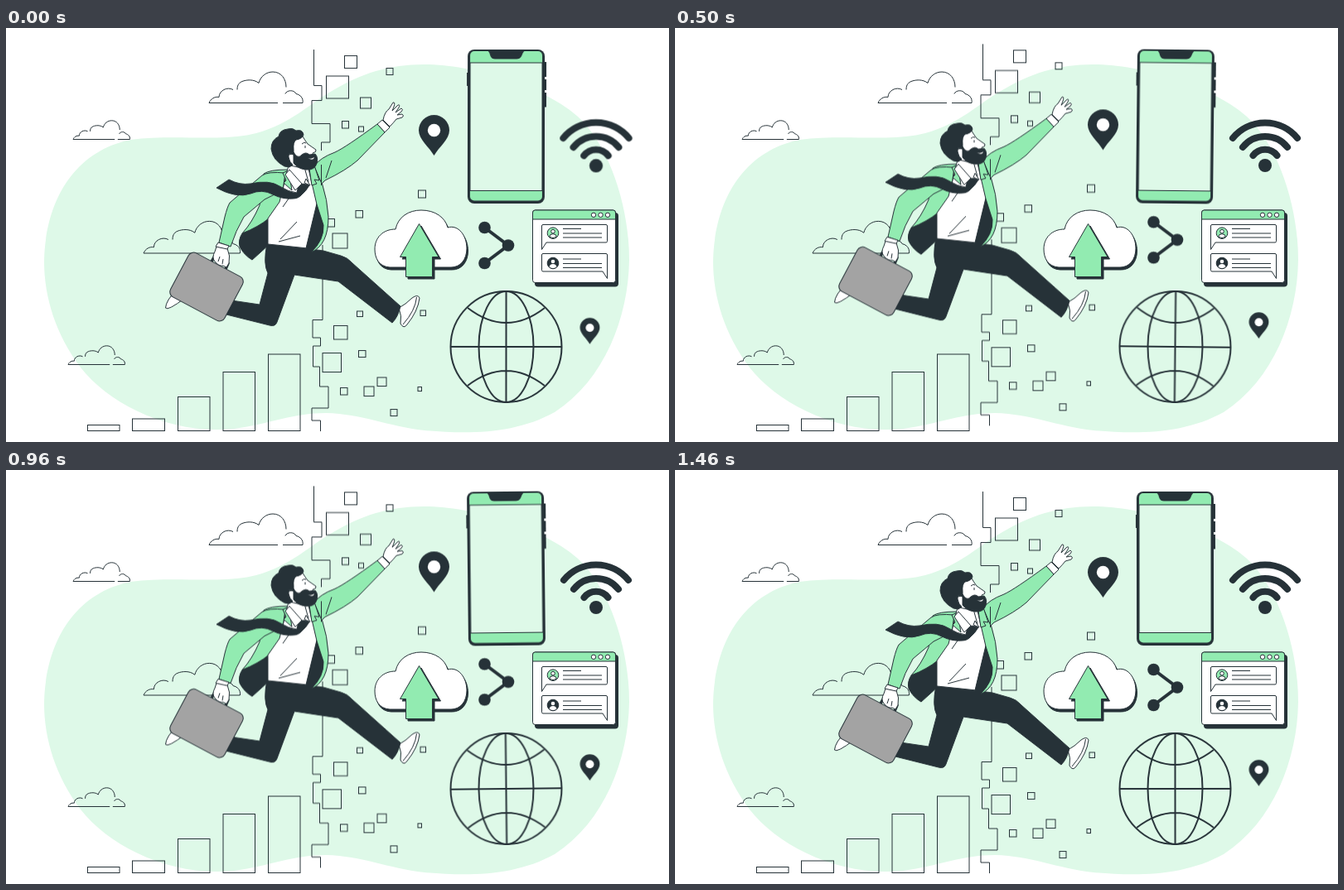
Write an HTML page without scripts that moves like this. It is 800x500 px and loops after 1500 ms.

```html
<!DOCTYPE html>
<html lang="en">
<head>
<meta charset="utf-8">
<title>Leap into digital</title>
<style>
  html, body { margin: 0; width: 100%; height: 100%; overflow: hidden; background: #fff; }
  svg { display: block; width: 100%; height: 100%; }
  .line { fill: none; stroke: #263238; stroke-width: 1; }
  .ink { fill: #263238; }
  .tint { fill: #def9e8; }
  .green { fill: #92ebb1; }
  .white { fill: #fff; }
  .edge { stroke: #263238; stroke-width: 1; stroke-linejoin: round; }
  .thin path { vector-effect: non-scaling-stroke; }

  .float, .sway, .beat { animation: float 1.5s linear -20ms infinite; }
  .sway { animation-name: sway; }
  .beat { animation-name: beat; transform-origin: 712px 142px; }
  .phone { transform-origin: 604px 119px; }
  .globe { transform-origin: 603.5px 385px; }

  @keyframes float {
    0%, 100% { transform: translateY(.3px); }
    50% { transform: translateY(-9.7px); }
  }
  @keyframes sway {
    0%, 100% { transform: rotate(0deg); }
    25% { transform: rotate(1deg); }
    75% { transform: rotate(-1deg); }
  }
  @keyframes beat {
    0%, 30%, 40%, 60%, 100% { transform: scale(1); }
    10%, 50% { transform: scale(1.1); }
  }
</style>
</head>
<body>
<svg viewBox="0 0 800 500">
  <defs>
    <g id="cloud" class="line thin">
      <path d="M0 0H83M89 0H113C114-6 110-10 105-11C103-16 94-16 92-11M93-19C93-29 87-37.5 77-37.5C69-37.5 62-32 60-24C54-29 45-28 40-26C35-24 34-20 34-16M29-16C22-20 12-15 12-7C7-8 2-5 0 0"/>
    </g>
    <g id="pin">
      <path class="ink" d="M0 30.5C-6 20-18.5 11-18.5 0A18.5 18.5 0 0 1 18.5 0C18.5 11 6 20 0 30.5Z"/>
      <circle class="white" r="7.7"/>
    </g>
    <path id="upload" d="M463 289C450 288 445 278 445 267C445 253 455 243 470 243C473 228 486 220 501 220C518 220 530 229 533 241C546 237 556 251 556 266C556 280 548 289 537 289Z"/>
    <path id="arrow" d="M498.5 236.5L522 276.5H514.5V300.5H482.5V276.5H475.5Z"/>
    <g id="bust">
      <circle cy="-2" r="2.3"/>
      <path d="M-4.3 4.5Q-4 1 0 1T4.3 4.5Q0 7.5-4.3 4.5Z"/>
    </g>
    <path id="lines" class="line" d="M0 0H22M0 5.5H47M0 10.5H47"/>
  </defs>

  <path class="tint" d="M46 282C47 215 78 150 150 135C205 128 260 138 302 127C345 115 365 92 395 75C430 54 465 43 510 44C575 46 655 75 690 107C728 142 752 215 752 280C751 350 722 425 662 464C615 490 560 491 505 486C460 481 430 466 386 465C345 465 320 478 275 484C200 492 125 455 90 410C60 370 46 325 46 282Z"/>

  <use href="#cloud" x="245" y="90.5"/>
  <use href="#cloud" transform="translate(81 134.5) scale(.605)"/>
  <use href="#cloud" transform="translate(166 272) scale(1.03)"/>
  <use href="#cloud" transform="translate(75 406.5) scale(.605)"/>

  <g class="line">
    <rect x="98.5" y="479.5" width="38.5" height="7"/>
    <rect x="152.5" y="472" width="39" height="14.5"/>
    <rect x="207.5" y="445.5" width="38.5" height="41"/>
    <rect x="262" y="415.5" width="38.5" height="71"/>
    <rect x="316.5" y="394" width="38.5" height="92.5"/>
  </g>

  <!-- pixel edge -->
  <g class="line float">
    <path d="M371.5 26V69.5H381V87.5H369V115.5H391V138H380.5V148M382 262V352.5H370V374H379.5V384H370.5V409H378.5V433H389V459H369V474H379.5V487"/>
    <rect x="408.5" y="33.5" width="15" height="15"/>
    <rect x="386.5" y="58" width="27" height="27"/>
    <rect x="459" y="48.5" width="8" height="8"/>
    <rect x="427.5" y="84" width="13" height="13"/>
    <rect x="405.5" y="112.5" width="8" height="8.5"/>
    <rect x="425.5" y="119" width="6" height="6"/>
    <rect x="497.5" y="196" width="9" height="9"/>
    <rect x="422" y="220.5" width="8.5" height="8.5"/>
    <rect x="387" y="230.5" width="9.5" height="9.5"/>
    <rect x="394" y="248" width="18" height="18"/>
    <rect x="448.5" y="320" width="9" height="9"/>
    <rect x="423.5" y="342" width="7" height="6.5"/>
    <rect x="500" y="341" width="6.5" height="6.5"/>
    <rect x="395.5" y="359.5" width="16.5" height="16.5"/>
    <rect x="425.5" y="389.5" width="8.5" height="8"/>
    <rect x="382" y="392.5" width="22.5" height="23"/>
    <rect x="403.5" y="434.5" width="8.5" height="8.5"/>
    <rect x="432" y="433" width="12" height="11.5"/>
    <rect x="448" y="422" width="11" height="10.5"/>
    <rect x="497" y="433.5" width="4.5" height="5"/>
    <rect x="464" y="460.5" width="8" height="8"/>
  </g>

  <!-- runner -->
  <g class="float">
    <g class="edge">
      <path class="white" d="M206 316Q193 329 192.500 338Q195 342 216 326Z"/>
      <path class="white" d="M474 338Q482 334 490 326Q497 321 499 326Q497 342 484 358Q480 364 476 357Q478 348 474 338Z"/>
      <path fill="none" d="M495.500 325Q494 341 479 358"/>
      <path class="ink" d="M315 260L383 269L404 275Q412 277 418 284L476 336Q473 349 466 356L401 306L348 298L327 355Q325 361 318 359L262 345L272 329L306 334L316 296Q310 285 315 260Z"/>

      <!-- coat and shirt -->
      <path class="ink" d="M318 222L285 248Q280 256 282 264Q287 274 297 280L318 261Z"/>
      <path class="green" d="M340 171Q318 171 311 176L306 214Q297 235 285 248Q305 240 317 230L345 200Z"/>
      <path class="white" d="M338 178L330 210L316 230V261L364 266L378 212L372 172L356 168Z"/>
      <path class="ink" d="M375 212L386 240Q382 262 368 270L362 266Z"/>
      <path class="green" d="M365 170L374 162L381 186Q388 208 389 228Q389 262 368 271Q384 256 383 238L375 213Z"/>
      <path fill="none" d="M329 258L355 251M331 255L351 234M334 216L341 206"/>

      <!-- rear arm -->
      <path class="green" d="M337 175Q316 173 309 178L284 199L270 211Q267 216 264 228L257 259L271 264Q277 245 287 228L312 207L334 196Z"/>
      <path class="green" d="M334 175L341 172L345 196L335 187L338 184Z"/>

      <!-- reaching arm -->
      <path class="white" d="M455 111Q457 101 462 98L467 90Q470 89 468 95L466 100L473 93Q476 92 474 96L470 102L477 97Q480 98 477 101L472 105L478 104Q481 106 478 108L471 110Q467 115 463 119Z"/>
      <path class="white" d="M448 116L454 111L463 120L457 126Z"/>
      <path class="green" d="M372 167Q378 157 397 150Q410 144 448 116L457 126L424 160Q410 172 385 184L381 188Z"/>
      <path fill="none" d="M380.500 165V190M386 181L393 160"/>
      <path class="green" d="M366 170L372 166L378 184L372 183L375 188L369 190Z"/>

      <!-- neck, collar, tie -->
      <path class="white" d="M342 162L338 177L356 194L365 186L360 168Z"/>
      <path class="white" d="M337 177L342 171L357 188L349 196ZM362 182L367 190L360 187Z"/>
      <path class="ink" d="M254 193L269 183Q282 190 295 188Q318 183 330 191Q341 198 351 199Q351 192 358 188L366 190Q362 197 357 201Q353 206 346 206Q334 207 322 201Q309 194 295 200Q278 206 254 193Z"/>

      <!-- head -->
      <path class="white" d="M347 134L358 131Q361 136 364 140L374 147Q375 150 370 151L372 158L366 167L352 168L343 166Q338 160 341 153L346 152Z"/>
      <path class="ink" d="M336 167Q322 160 320 146Q320 135 329 131Q330 123 340 122Q346 120 350 124Q358 122 359 129Q357 134 350 135Q346 138 347 147L347 153Q340 149 341 156Q342 162 346 165L342 168Z"/>
      <path class="ink" d="M347 150Q352 159 357 153Q362 149 366 153L373 152Q377 156 375 163Q373 172 362 171Q352 170 347 163Z"/>
      <path class="white" stroke="none" d="M364 157Q368 159 372 156Q371 161 364 157Z"/>
      <path fill="none" d="M357 140Q360 137 362 139M361 142V145"/>

      <!-- briefcase -->
      <path fill="none" stroke-width="3.500" d="M248 282L252 275L268 284L265 291"/>
      <rect x="205" y="282.500" width="74" height="60" rx="7" fill="#a3a3a3" transform="rotate(28 242 312.500)"/>
      <path class="white" d="M254 264L267 266Q271 275 269 284L266 289L262 287Q257 288 252 282Q248 277 252 270Z"/>
      <path fill="none" d="M256 282L258 276M261 285L262 279"/>
      <path class="white" d="M256 259L269 263L267 267L253 264Z"/>
    </g>
  </g>

  <g class="float">
    <use href="#pin" x="516.5" y="123.500"/>
    <use href="#pin" transform="translate(704.500 362) scale(.645)"/>
    <path class="line" style="stroke-width:4" d="M577.500 241L606 262.500L577.500 284"/>
    <g class="ink">
      <circle cx="577.500" cy="241" r="7.300"/>
      <circle cx="606" cy="262.500" r="7.300"/>
      <circle cx="577.500" cy="284" r="7.300"/>
    </g>
  </g>

  <!-- upload cloud -->
  <use href="#upload" class="ink edge" x="1.500" y="3"/>
  <use href="#upload" class="white edge"/>
  <use href="#arrow" class="ink edge" x="2.500" y="2.500"/>
  <use href="#arrow" class="green edge"/>

  <!-- chat window -->
  <rect class="ink" x="638" y="223" width="101" height="89.500" rx="4"/>
  <rect class="white edge" x="635.500" y="220" width="100" height="87.500" rx="3"/>
  <path class="green edge" d="M635.500 231V223Q635.500 220 638.500 220H732.500Q735.500 220 735.500 223V231Z"/>
  <g class="white edge">
    <circle cx="709" cy="225.800" r="2.700"/>
    <circle cx="717.500" cy="225.800" r="2.700"/>
    <circle cx="726" cy="225.800" r="2.700"/>
    <path d="M646.500 267.500V239Q646.500 237.500 648 237.500H724Q725.500 237.500 725.500 239V257.500Q725.500 259 724 259H652Z"/>
    <path d="M725.500 302.500V274Q725.500 272.500 724 272.500H648Q646.500 272.500 646.500 274V292.500Q646.500 294 648 294H720Z"/>
  </g>
  <circle class="green edge" cx="660" cy="247.700" r="6.800"/>
  <use href="#bust" class="white edge" x="660" y="247.700"/>
  <circle class="ink edge" cx="660" cy="284" r="6.800"/>
  <use href="#bust" class="white" x="660" y="284"/>
  <use href="#lines" x="672" y="242.500"/>
  <use href="#lines" x="672" y="279"/>

  <g class="sway phone">
    <path class="ink" d="M556 54h3v16h-3zM649 41h3v18h-3zM649 62h3v13h-3zM649 78h3v17.500h-3z"/>
    <rect class="ink" x="557" y="26" width="93" height="186" rx="8"/>
    <rect class="green" x="560" y="28" width="87" height="180.500" rx="5"/>
    <path class="tint edge" d="M560 42H647V196.500H560Z"/>
    <path class="ink" d="M581 27H626Q623 30 622 34Q620 37.500 616 37.500H590Q586 37.500 584.500 34Q584 30 581 27Z"/>
  </g>

  <g class="beat">
    <circle class="ink" cx="712" cy="166" r="8"/>
    <path class="line" style="stroke-width:8;stroke-linecap:round" d="M673 133A50.400 50.400 0 0 1 751 133M685 144A34.600 34.600 0 0 1 739 144M697.500 154A18.200 18.200 0 0 1 726.500 154"/>
  </g>

  <g class="line sway globe" style="stroke-width:2">
    <circle cx="603.500" cy="385" r="67"/>
    <ellipse cx="603.500" cy="385" rx="33" ry="67"/>
    <path d="M603.500 318V452M536.500 385H670.500M557 338Q603.500 374 650 338M557 432Q603.500 396 650 432"/>
  </g>
</svg>
</body>
</html>
```
